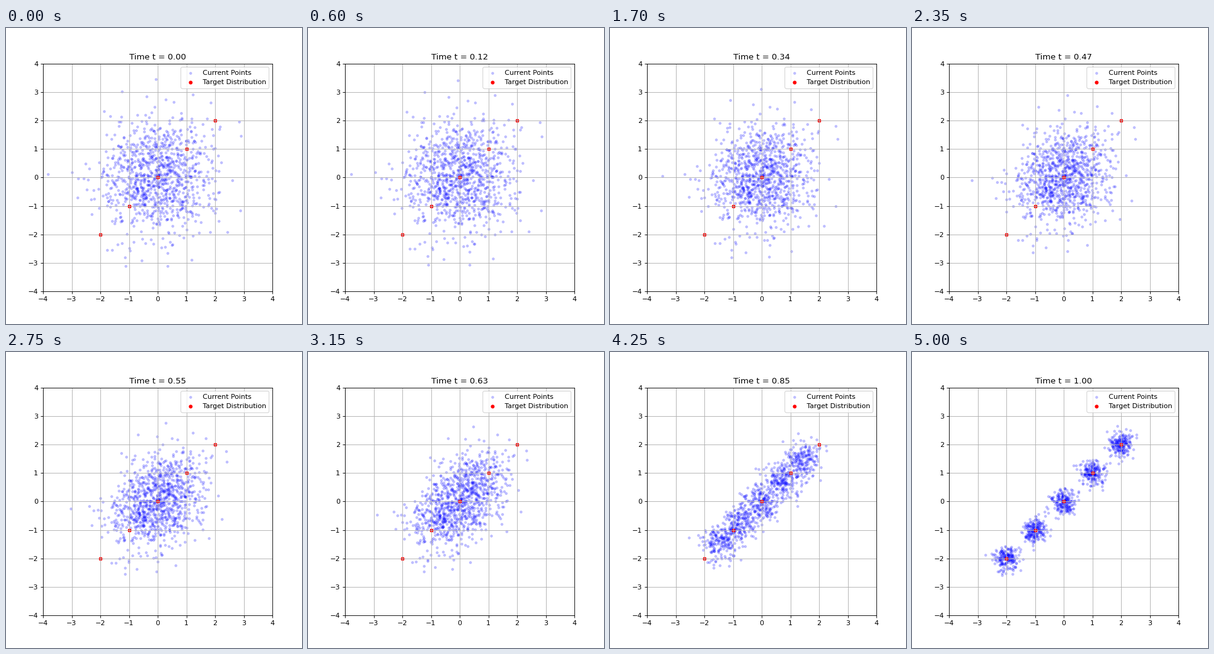
A matplotlib script that plays this animation: 480 by 480 pixels, repeating every 5050 ms.

```python
import numpy as np
import matplotlib.pyplot as plt
from matplotlib.animation import FuncAnimation

COUNT, STEPS = 1000, 100
SPREAD = 0.225
CENTERS = np.array([[c, c] for c in (-2, -1, 0, 1, 2)], float)


def normal_pairs(seed, count):
    """Box-Muller normals in blocks of sixteen."""
    raw = np.random.RandomState(seed).randint(0, 2**32, 2 * count, dtype=np.uint32)
    u = (raw & 0xFFFFFF).reshape(-1, 2, 8) / 2**24
    r = np.sqrt(-2 * np.log(1 - u[:, 0]))
    a = 2 * np.pi * u[:, 1]
    return np.stack([r * np.cos(a), r * np.sin(a)], axis=1).reshape(count, 2)


def velocity(x, t):
    """Flow from a unit normal to a mixture around CENTERS, eased by t squared."""
    a = t * t
    var = (1 - a) ** 2 + (SPREAD * a) ** 2
    diff = x[:, None] - a * CENTERS
    logw = -(diff ** 2).sum(2) / (2 * var)
    w = np.exp(logw - logw.max(1, keepdims=True))
    w /= w.sum(1, keepdims=True)
    rate = (SPREAD ** 2 * a - (1 - a)) / var
    return 2 * t * (w[..., None] * (CENTERS + rate * diff)).sum(1)


path = [normal_pairs(42, COUNT)]
for k in range(STEPS):
    path.append(path[-1] + velocity(path[-1], k / STEPS) / STEPS)

fig, ax = plt.subplots(figsize=(6, 6), dpi=80)
dots = ax.scatter(*path[0].T, s=10, c="blue", alpha=0.2, label="Current Points")
ax.scatter(*CENTERS.T, s=20, c="red", label="Target Distribution")
ax.set_xlim(-4, 4)
ax.set_ylim(-4, 4)
ax.grid(True)
ax.legend(loc="upper right")
title = ax.set_title("Time t = 0.00")


def draw(i):
    dots.set_offsets(path[i])
    title.set_text(f"Time t = {i / STEPS:.2f}")
    return dots, title


anim = FuncAnimation(fig, draw, frames=STEPS + 1, interval=50, repeat=True, repeat_delay=0)
plt.show()
```
